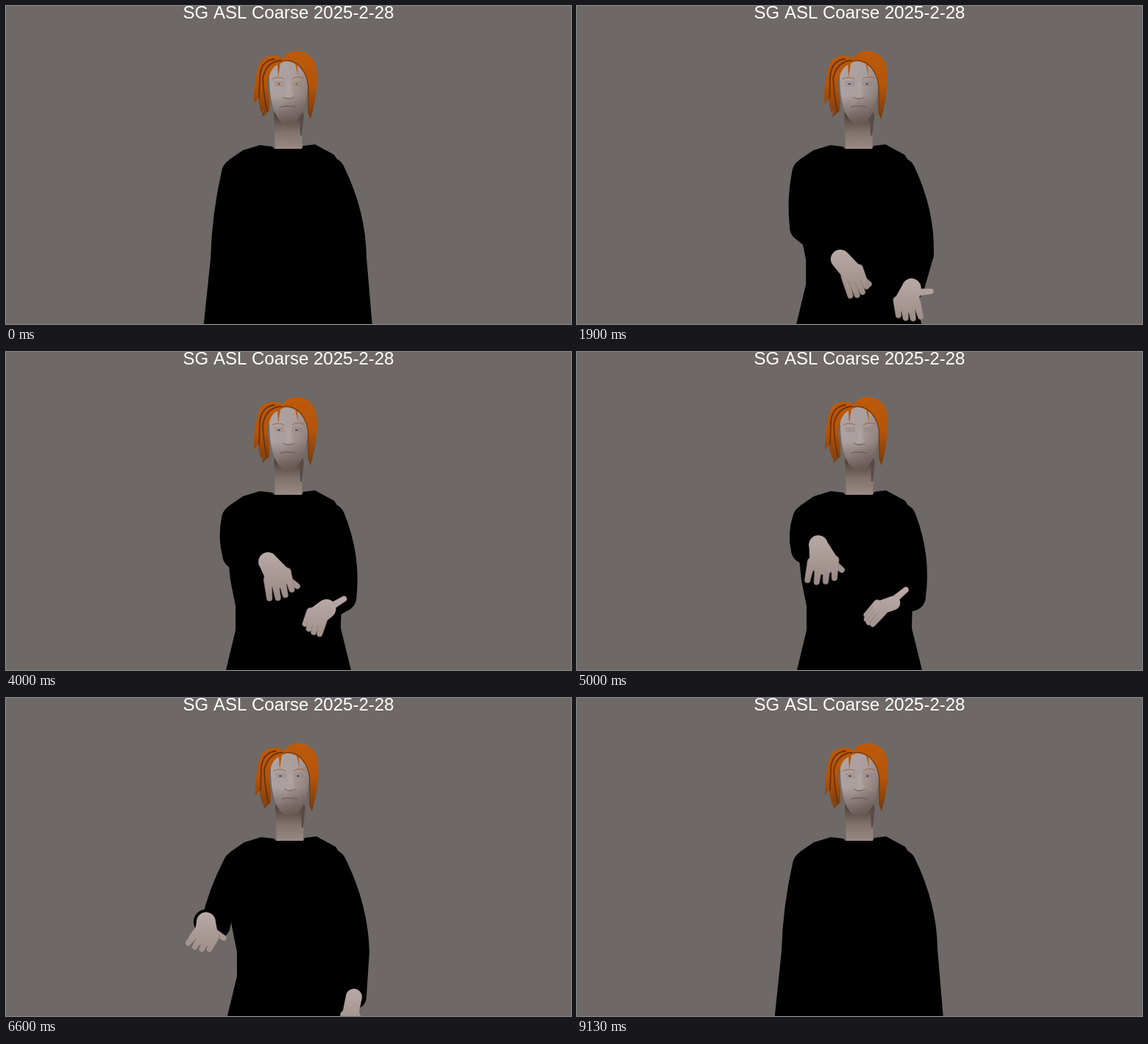
An HTML page with a canvas for the animation above (9.23 s loop, 768 by 432 pixels).

```html
<!DOCTYPE html>
<html lang="en">
<meta charset="utf-8">
<title>Signing figure</title>
<style>
  html, body { margin: 0; width: 100%; height: 100%; overflow: hidden; background: #6e6966; }
  canvas { display: block; }
</style>
<canvas id="stage" width="768" height="432"></canvas>
<script>
const ctx = document.getElementById('stage').getContext('2d');
const LOOP = 9230, STEP = 100;

const pose = (elbow, wrist, tip, thumb, width) => ({ elbow, wrist, tip, thumb, width });
const hanging = (elbow, [x, y]) => pose(elbow, [x, y], [x, y + 58], [x + 10, y + 40], 22);

const poses = {
  rest: { left: hanging([298, 345], [283, 460]), right: hanging([470, 342], [483, 460]) },
  out: { left: hanging([287, 347], [272, 435]), right: hanging([485, 345], [494, 455]) },
  meet: {
    left: pose([318, 284], [389, 312], [426, 357], [438, 344], 30),
    right: pose([459, 334], [442, 358], [438, 395], [474, 350], 36)
  },
  lift: {
    left: pose([311, 268], [328, 262], [332, 314], [360, 296], 38),
    right: pose([454, 332], [430, 341], [394, 366], [447, 323], 19)
  },
  side: {
    left: pose([283, 308], [270, 304], [259, 341], [294, 326], 32),
    right: hanging([472, 345], [471, 406])
  },
  away: {
    left: pose([278, 328], [252, 338], [243, 386], [270, 372], 30),
    right: hanging([470, 344], [478, 440])
  }
};
const timeline = [[0, 'rest'], [700, 'out'], [2500, 'meet'], [3000, 'meet'], [4900, 'lift'],
  [5050, 'lift'], [6600, 'side'], [7050, 'away'], [7800, 'rest'], [LOOP, 'rest']];

const bump = (t, at, reach) => Math.abs(t - at) < reach ? (1 + Math.cos((t - at) / reach * Math.PI)) / 2 : 0;
const sway = t => -4.5 * bump(t, 1100, 1100) + 2 * bump(t, 6500, 900) - 2.5 * bump(t, 7800, 1000);
const eyeOpening = t => t < 200 ? 1 : .6 * (1 - bump(t, 5000, 300));

const mix = (a, b, u) => Array.isArray(a) ? a.map((v, i) => mix(v, b[i], u)) : a + (b - a) * u;

function sample(side, t) {
  const i = timeline.findIndex(k => k[0] > t);
  const [t0, from] = timeline[i - 1], [t1, to] = timeline[i];
  const u = (t - t0) / (t1 - t0), e = u * u * (3 - 2 * u);
  const a = poses[from][side], b = poses[to][side], now = {};
  for (const part in a) now[part] = mix(a[part], b[part], e);
  return now;
}

function gradient(x0, y0, x1, y1, ...colors) {
  const g = ctx.createLinearGradient(x0, y0, x1, y1);
  colors.forEach((c, i) => g.addColorStop(i / (colors.length - 1), c));
  return g;
}

function fill(path, color) {
  ctx.fillStyle = color;
  ctx.fill(new Path2D(path));
}

function stroke(path, color, width) {
  ctx.strokeStyle = color;
  ctx.lineWidth = width;
  ctx.stroke(new Path2D(path));
}

function taper([ax, ay], ar, [bx, by], br, color) {
  const h = Math.atan2(by - ay, bx - ax), q = Math.PI / 2;
  ctx.fillStyle = color;
  ctx.beginPath();
  ctx.arc(ax, ay, ar, h + q, h + 3 * q);
  ctx.arc(bx, by, br, h - q, h + q);
  ctx.fill();
}

function finger(from, to, skin) {
  taper(from, 6.3, to, 4.4, '#75676480');
  taper(from, 5.3, to, 3.7, skin);
}

// bend is +1 or -1: the side to which the knuckles arch
function hand({ wrist, tip, thumb, width }, bend) {
  const skin = gradient(0, wrist[1] - 15, 0, wrist[1] + 60, '#b9aaa8', '#95857f');
  const dx = tip[0] - wrist[0], dy = tip[1] - wrist[1], length = Math.hypot(dx, dy);
  const nx = dy / length, ny = -dx / length;
  const knuckle = [wrist[0] + dx * .42 + nx * bend * 5, wrist[1] + dy * .42 + ny * bend * 5];
  finger(mix(wrist, knuckle, .4), thumb, skin);
  for (let i = 0; i < 4; i++) {
    const across = (i - 1.5) / 3 * (width - 6);
    const short = .07 * Math.abs(i - 1.5);
    const base = [knuckle[0] + nx * across, knuckle[1] + ny * across];
    const end = [tip[0] + nx * across * 1.15 - dx * short, tip[1] + ny * across * 1.15 - dy * short];
    finger(base, end, skin);
  }
  taper(wrist, Math.min(13, width * .5), knuckle, width * .5, skin);
}

function arm([sx, sy], { elbow: [ex, ey], wrist }, bulge) {
  stroke(`M${sx} ${sy}Q${(sx + ex) / 2 + bulge} ${(sy + ey) / 2} ${ex} ${ey}`, '#000', 40);
  taper([ex, ey], 20, wrist, 17, '#000');
}

function torso() {
  fill('M365 194L362 191L345 189L322 196L303 209L296 222L305 310L312 345V378L299 432H469L455 375L456 340L460 300L461 226L446 202L420 188L404 190L402 194Z', '#000');
}

function head(open) {
  fill('M364 145L366 196H402L404 145Z', gradient(0, 150, 0, 195, '#54453f', '#83736e', '#9a8a85'));
  fill('M399 145L405 148L402 176H400Z', '#574a47');

  const face = 'M358 98C358 82 367 74 384 73C403 74 411 87 410 108C409 132 403 151 391 158Q384 161 375 157C365 150 358 129 358 98Z';
  fill(face, gradient(358, 95, 414, 118, '#aea3a3', '#aa9e9d', '#887975'));
  fill(face, gradient(0, 122, 0, 160, '#5f504c00', '#5f504cdd'));

  fill('M364 102H378V109H366ZM389 102H402V109H390Z', '#8a7c7a55');
  for (const x of [371, 395]) {
    fill(`M${x - 4} 106Q${x} ${106 - 4 * open} ${x + 4} 106Q${x} ${106 + 4 * open} ${x - 4} 106Z`, '#b8adaa');
    ctx.fillStyle = open > .9 ? '#a7642a' : '#594b48';
    ctx.fillRect(x - 2, 106 - 1.6 * open, 4, 3.2 * open);
  }
  stroke('M362 99Q370 95 378 99M389 99Q397 94 405 98', '#a0653f', 1);
  fill('M382 103L386 104L391 124L386 127L377 125L382 119Z', '#bcb1af55');
  stroke('M377 124Q384 128 391 124', '#756663', 1.4);
  stroke('M373 137Q383 135 394 137', '#715f5b', 1.3);

  const hair = gradient(0, 62, 0, 154, '#bd5a0b', '#b45409', '#743a10');
  fill('M379 75C374 66 358 65 348 73C340 82 341 95 337 112V133L342 126L347 146L350 139L348 151L358 142V125L355 108C357 94 361 83 369 80L370 97L373 78Z', hair);
  stroke('M374 74Q354 75 349 98Q350 123 355 143M365 72Q347 74 345 95L344 125', '#6d310b', 1.8);
  fill('M375 75C378 65 387 61 396 61C411 62 420 72 422 85C425 106 420 133 414 154L411 147V108C410 98 405 87 396 80L397 95L393 78Q384 74 375 75Z', hair);
  stroke('M376 75Q386 72 396 79Q410 91 411 112V145', '#79370b', 1.2);
}

function draw(t) {
  const left = sample('left', t), right = sample('right', t);
  ctx.fillStyle = '#6e6966';
  ctx.fillRect(0, 0, 768, 432);
  ctx.fillStyle = '#fff';
  ctx.font = '24px "Liberation Sans", Arial, sans-serif';
  ctx.textAlign = 'center';
  ctx.fillText('SG ASL Coarse 2025-2-28', 384, 17);

  ctx.save();
  ctx.translate(sway(t), 0);
  head(eyeOpening(t));
  torso();
  arm([313, 227], left, -6);
  arm([441, 226], right, 14);
  hand(right, -1);
  hand(left, 1);
  ctx.restore();
}

ctx.lineCap = ctx.lineJoin = 'round';
function tick() {
  const t = performance.now() % LOOP;
  draw(Math.floor(t / STEP) * STEP);
  requestAnimationFrame(tick);
}
tick();
</script>
</html>
```
